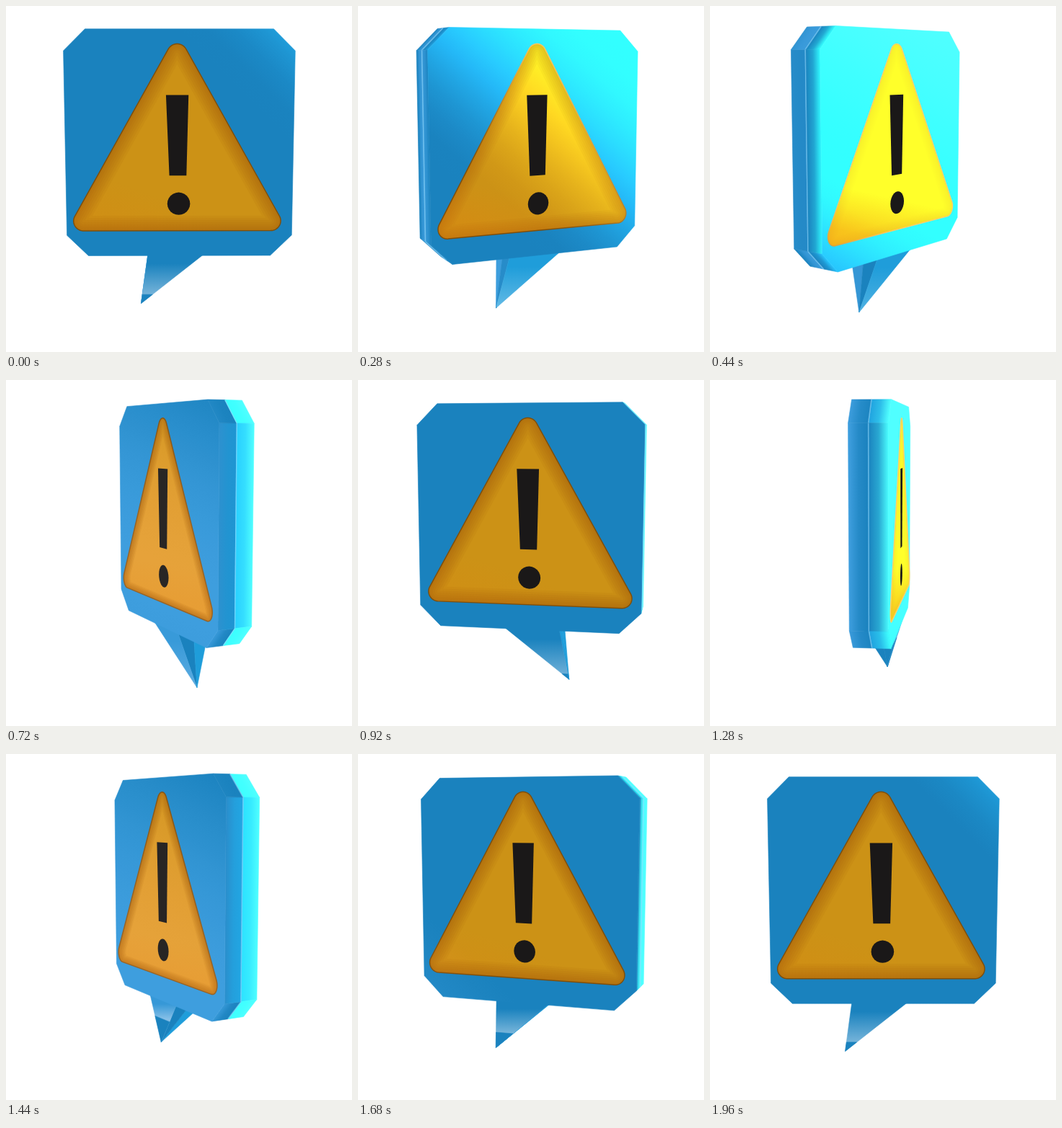
Animation, 480 px wide and 480 px high, one loop 2 s. Source, as an HTML page with a canvas:

```html
<!DOCTYPE html>
<html>
<head>
<meta charset="utf-8">
<title>Warning bubble</title>
<style>
html, body { margin: 0; width: 100%; height: 100%; overflow: hidden; background: #fff; }
canvas { display: block; width: 480px; height: 480px; }
</style>
</head>
<body>
<canvas id="stage" width="480" height="480"></canvas>
<script>
const ctx = document.getElementById('stage').getContext('2d');
const LOOP = 2000, STEP = 40, RAD = Math.PI / 180;
const FOCAL = 1134, TILT_SIN = 0.14, TILT_COS = 0.99;
const DEPTH = 24;

// Each material: colour in shade, added by full light, added at a grazing angle
const BLUE = { base: [26, 130, 190], light: [24, 125, 130], graze: [36, 28, 32] };
const GOLD = { base: [204, 146, 22], light: [90, 115, 20], graze: [26, 16, 36] };
const RIM = { base: [125, 78, 12], light: [140, 130, 90], graze: [25, 22, 28] };
const INK = { base: [26, 24, 24], light: [0, 0, 0], graze: [18, 17, 15] };

// Outline of the bubble, counterclockwise, y up
const HALF = [[125, -103], [154, -74.5], [154, 175.5], [125, 204]];
const BODY = [...HALF, ...HALF.map(([x, y]) => [-x, y]).reverse()];
const SIGN = roundedPoly([[-128, -54.5], [128, -54.5], [0, 171]], 13.5);
const BAR = [[-10.7, 8.3], [12.5, 8.3], [15.2, 117], [-15, 117]];
const DOT = arc(2, -30.4, 15.5, 0, 360);

function arc(x, y, r, from, to) {
  const pts = [];
  for (let i = 0; i <= 24; i++) {
    const t = (from + (to - from) * i / 24) * RAD;
    pts.push([x + r * Math.cos(t), y + r * Math.sin(t)]);
  }
  return pts;
}

function roundedPoly(pts, r) {
  const n = pts.length;
  const heading = (p, q) => Math.atan2(q[1] - p[1], q[0] - p[0]) / RAD - 90;
  return pts.flatMap((p, i) => {
    const from = heading(pts[(i + n - 1) % n], p);
    let to = heading(p, pts[(i + 1) % n]);
    while (to < from) to += 360;
    return arc(p[0], p[1], r, from, to);
  });
}

const rgb = c => `rgb(${c.map(Math.round).join(',')})`;
const mix = (a, b, t) => a.map((v, i) => v + (b[i] - v) * t);
const wrap = deg => ((deg + 180) % 360 + 360) % 360 - 180;

function smooth(t) {
  t = Math.min(1, Math.max(0, t));
  return t * t * (3 - 2 * t);
}

// Colour of a surface turned by deg; the lamp stands to the right
function shade(m, deg) {
  const a = wrap(deg);
  const lit = smooth((a - 14) / 30), hot = smooth((a - 45) / 35);
  const graze = a < -35 && a > -125 ? Math.cos(2 * (a + 80) * RAD) : 0;
  return m.base.map((v, i) =>
    Math.min(255, v + m.light[i] * lit + m.graze[i] * graze + (i ? 0 : 30 * hot)));
}

function project([x, y, z], deg) {
  const c = Math.cos(deg * RAD), s = Math.sin(deg * RAD);
  const px = x * c + z * s, pz = z * c - x * s;
  const k = FOCAL / (FOCAL - y * TILT_SIN - pz * TILT_COS);
  return [240.4 + px * k, 240 - (y * TILT_COS - pz * TILT_SIN) * k];
}

const flat = (pts, z, deg, shift = 0) =>
  pts.map(([x, y]) => project([x + shift, y, z], deg));

function facing(pts) {
  let area = 0;
  pts.forEach((p, i) => {
    const q = pts[(i + 1) % pts.length];
    area += p[0] * q[1] - q[0] * p[1];
  });
  return area < 0;
}

function trace(pts) {
  ctx.beginPath();
  pts.forEach(p => ctx.lineTo(p[0], p[1]));
  ctx.closePath();
}

function fill(pts, paint, seam = 0.6) {
  trace(pts);
  ctx.fillStyle = paint;
  ctx.fill();
  if (seam) {
    ctx.strokeStyle = paint;
    ctx.lineWidth = seam;
    ctx.stroke();
  }
}

function blend(a, b, ...colors) {
  const g = ctx.createLinearGradient(a[0], a[1], b[0], b[1]);
  colors.forEach((c, i) => g.addColorStop(i / (colors.length - 1), c));
  return g;
}

// Light sweeps a face from lower left to upper right
function sheen(m, deg, spread) {
  const a = project([-150, -100, DEPTH], deg), b = project([150, 200, DEPTH], deg);
  const colors = Array.from({ length: 17 }, (_, i) => rgb(shade(m, deg + spread * (i / 8 - 1))));
  return blend(a, b, ...colors);
}

function drawTail(deg, side) {
  const [lx, rx, tx] = side > 0 ? [-43, 35, -54] : [-35, 43, 54];
  const at = (x, y, z) => project([x, y, z], deg);
  const left = at(lx, -100, DEPTH), right = at(rx, -100, DEPTH), tip = at(tx, -178, 0);
  const tone = d => shade(BLUE, Math.min(wrap(d), 23));

  const walls = [
    [[tip, left, at(lx, -100, 0)], -70],
    [[right, tip, at(rx, -100, 0)], 70]
  ];
  for (const [pts, turn] of walls) {
    if (facing(pts)) fill(pts, rgb(tone(deg + turn)));
  }

  const front = [left, tip, right];
  if (!facing(front)) return;
  const near = -tx * Math.sin(deg * RAD);
  const dark = Math.max(0, 12 - 0.5 * near) / 66;
  const base = tone(deg);
  const glow = mix(base, [225, 238, 250], 0.46 - 0.005 * Math.max(0, near));
  const top = (left[1] + right[1]) / 2;
  const end = tip[1] + (top - tip[1]) * dark;
  fill(front, blend([0, top + (end - top) / 4], [0, end], rgb(base), rgb(glow)));
  if (dark > 0) {
    fill([mix(tip, left, dark), tip, mix(tip, right, dark)], rgb(BLUE.base));
  }
}

// Half of the rim: from the seam it rounds into the colour of its face
function drawWalls(deg) {
  BODY.forEach((p, i) => {
    const q = BODY[(i + 1) % BODY.length];
    const dx = q[0] - p[0], dy = q[1] - p[1];
    const nx = dy / Math.hypot(dx, dy);
    const pts = [[p, 0], [q, 0], [q, DEPTH], [p, DEPTH]]
      .map(([v, z]) => project([v[0], v[1], z], deg));
    if (!facing(pts)) return;

    const [a, b, , d] = pts;
    const ex = b[0] - a[0], ey = b[1] - a[1];
    const k = ((d[0] - a[0]) * ey - (d[1] - a[1]) * ex) / (ex * ex + ey * ey);
    const foot = [a[0] + ey * k, a[1] - ex * k];
    const u = (p[0] + q[0] + p[1] + q[1] - 100) / 600;
    const edge = shade(BLUE, deg + 24 * Math.max(-1, Math.min(1, u)));
    const seam = shade(BLUE, deg + 85 * nx);
    fill(pts, blend(a, foot, rgb(seam), rgb(mix(seam, edge, 0.3)), rgb(edge)));

    ctx.beginPath();
    ctx.moveTo(a[0], a[1]);
    ctx.lineTo(b[0], b[1]);
    ctx.strokeStyle = 'rgba(150,220,255,0.5)';
    ctx.lineWidth = 1.5;
    ctx.stroke();
  });
}

function drawSign(deg, shift) {
  const pts = flat(SIGN, DEPTH + 1, deg, shift);
  const lit = smooth((wrap(deg) - 10) / 35);
  const squeeze = Math.max(0.3, Math.abs(Math.cos(deg * RAD)));
  fill(pts, sheen(GOLD, deg, 26), 0);

  // Embossed border, warm along the lower edge
  ctx.save();
  trace(pts);
  ctx.clip();
  ctx.lineJoin = 'round';
  ctx.strokeStyle = `rgba(140,75,0,${0.07 * (1 - 0.9 * lit)})`;
  for (let w = 6; w <= 42; w += 6) {
    ctx.lineWidth = w * squeeze;
    ctx.stroke();
  }
  const low = project([-60, -68, DEPTH], deg), high = project([-40, -15, DEPTH], deg);
  ctx.fillStyle = blend(low, high, `rgba(235,120,10,${0.1 + 0.25 * lit})`, 'rgba(235,120,10,0)');
  ctx.fill();
  ctx.restore();

  trace(pts);
  ctx.strokeStyle = sheen(RIM, deg, 26);
  ctx.lineWidth = 1.5;
  ctx.stroke();

  const ink = rgb(shade(INK, Math.min(wrap(deg), 0)));
  for (const shape of [BAR, DOT]) fill(flat(shape, DEPTH + 1, deg, shift), ink, 0);
}

function drawFront(deg, side) {
  const pts = flat(BODY, DEPTH, deg);
  if (!facing(pts)) return;
  fill(pts, sheen(BLUE, deg, 24));
  drawSign(deg, side > 0 ? -3 : 0);
}

function draw(time) {
  const p = (Math.floor((time % LOOP) / STEP) + 1) * STEP / LOOP;
  const turn = 360 * smooth(p);
  ctx.fillStyle = '#fff';
  ctx.fillRect(0, 0, 480, 480);
  for (const part of [drawTail, drawWalls, drawFront]) {
    part(turn + 180, -1);
    part(turn, 1);
  }
}

const start = performance.now();
function tick() {
  draw(Math.max(0, performance.now() - start));
  requestAnimationFrame(tick);
}
tick();
</script>
</body>
</html>
```
